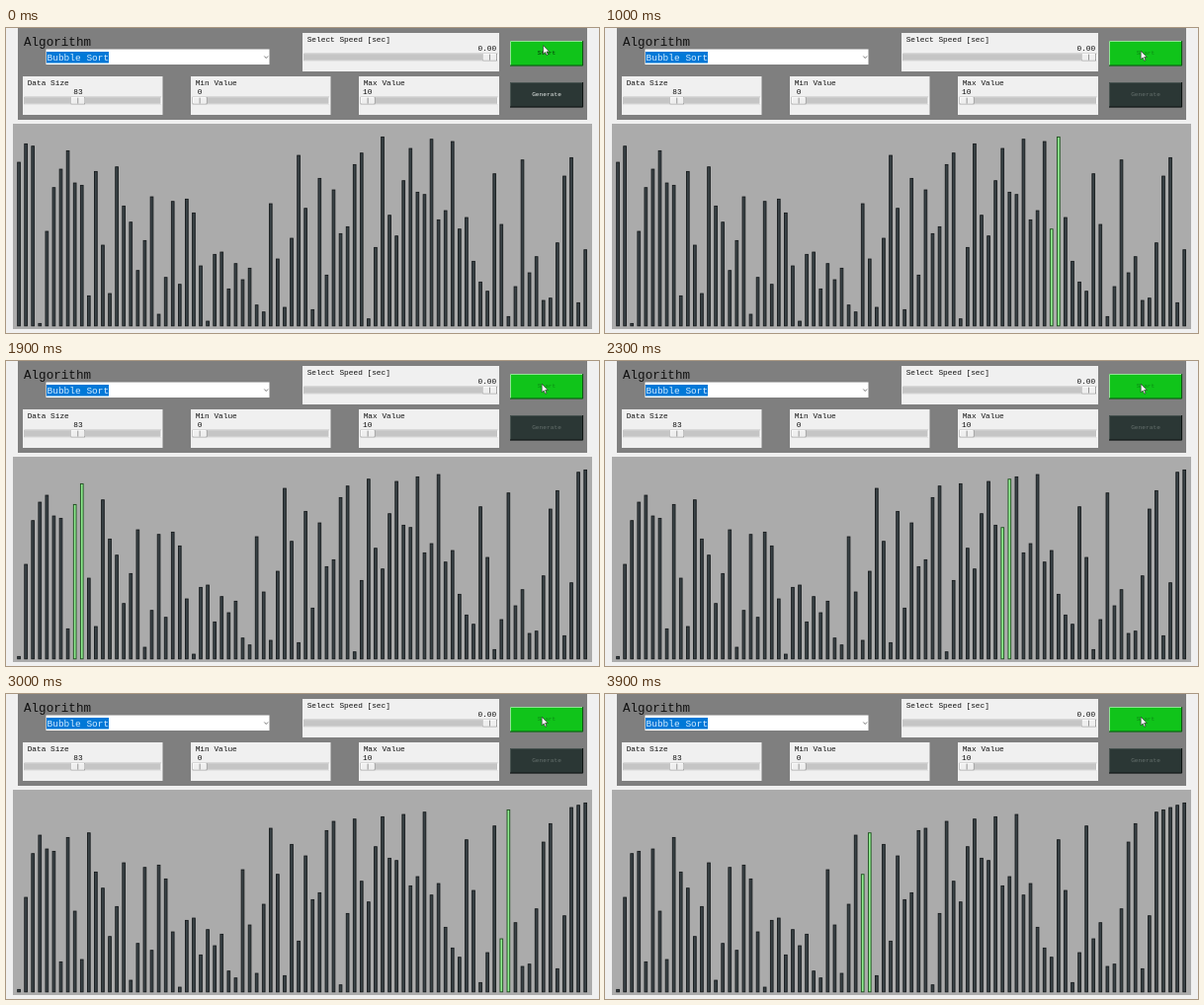
These frames come from a looping animation (600 by 309 pixels, 4000 ms). An HTML page:

```html
<!DOCTYPE html>
<html>
<head>
<meta charset="utf-8">
<style>
html, body { margin: 0; width: 100%; height: 100%; overflow: hidden; background: #f0f0f0; }
svg { display: block; width: 600px; height: 309px; }
text { font-family: "Liberation Mono", "Courier New", monospace; font-size: 7.8px; fill: #111; white-space: pre; }
.bar { fill: #3a4347; stroke: #15191b; stroke-width: .9; }
.bar.hot { fill: #90ee90; stroke: #1c4a1c; }
</style>
</head>
<body>
<svg id="stage" viewBox="0 0 600 309">
  <rect width="600" height="309" fill="#f0f0f0"/>
  <rect x="12" width="576" height="93" fill="#7f7f7f"/>
  <rect x="7" y="97" width="586" height="208" fill="#ababab"/>
  <text x="18" y="18" style="font-size:12.6px">Algorithm</text>
  <rect x="40.5" y="21.5" width="226" height="15.5" fill="#fff"/>
  <rect x="41" y="24" width="63" height="11.5" fill="#0078d7"/>
  <text x="41.5" y="32.5" style="font-size:9.5px;fill:#d5ebff">Bubble Sort</text>
  <path d="M261.3 28.5l1.9 2 1.9-2" fill="none" stroke="#555" stroke-width=".8"/>
  <g id="sliders"></g>
  <g id="buttons"></g>
  <g id="bars"></g>
  <path id="cursor" d="M0 0V8.6L2 6.8 3.4 10 4.8 9.4 3.4 6.3H6Z" fill="#fff" stroke="#222" stroke-width=".6"/>
</svg>
<script>
const LOOP = 4000, STEP = 100;
const byId = id => document.getElementById(id);

function add(parent, tag, attrs, content = '') {
  const el = document.createElementNS('http://www.w3.org/2000/svg', tag);
  for (const name in attrs) el.setAttribute(name, attrs[name]);
  el.textContent = content;
  return parent.appendChild(el);
}

function slider(x, y, width, label, value, knob, valueX) {
  const g = add(byId('sliders'), 'g', { transform: `translate(${x} ${y})` });
  const box = (x, y, w, h, fill) => add(g, 'rect', { x, y, width: w, height: h, fill });
  box(0, 0, width, 39, '#f0f0f0');
  add(g, 'text', { x: 4.7, y: 9.3 }, label);
  add(g, 'text', { x: valueX - x, y: 18.3 }, value);
  box(1.5, 20.7, width - 3, 7.6, '#a0a0a0');
  box(2, 21.2, width - 3, 7.1, '#fff');
  box(2, 21.2, width - 4, 6.6, '#c5c5c5');
  const k = knob - x;
  box(k, 21, 14.3, 7.2, '#6d6d6d');
  box(k, 21, 13.7, 6.6, '#fff');
  box(k + .6, 21.6, 13.1, 6, '#efefef');
  box(k + 6.7, 21.6, .8, 6, '#808080');
}
slider(300, 5, 199, 'Select Speed [sec]', '0.00', 482.5, 477.5);
slider(17, 49, 141.5, 'Data Size', '83', 65.7, 68.3);
slider(187, 49, 141.5, 'Min Value', '0', 189, 193.7);
slider(357, 49, 142, 'Max Value', '10', 359, 361);

function button(y, fill, light, dark, label) {
  const g = add(byId('buttons'), 'g', {});
  add(g, 'rect', { x: 510, y, width: 74, height: 25.3, fill });
  const upper = add(g, 'path', { d: `M510.5 ${y + 25}V${y + .5}H584`, fill: 'none' });
  const lower = add(g, 'path', { d: `M510 ${y + 25}H583.6V${y}`, fill: 'none' });
  const text = add(g, 'text', { x: 547, y: y + 14.4, 'text-anchor': 'middle', style: 'font-size:6.2px' }, label);
  return (color, sunken) => {
    upper.setAttribute('stroke', sunken ? dark : light);
    lower.setAttribute('stroke', sunken ? light : dark);
    text.style.fill = color;
  };
}
const drawStart = button(13, '#10c41a', '#8fe594', '#0b4d10', 'Start');
const drawGenerate = button(55, '#2b3735', '#46524f', '#0c1110', 'Generate');

// Rank 0 is the tallest bar.
const ranks = [
  11, 3, 4, 81, 41, 22, 14, 6, 20, 21, 69, 15, 47, 68, 13, 30, 37, 58, 45, 26, 77,
  61, 28, 64, 27, 33, 56, 80, 51, 50, 66, 55, 62, 57, 73, 76, 29, 53, 74, 44, 8,
  31, 75, 18, 60, 23, 42, 39, 12, 7, 79, 48, 0, 34, 43, 19, 5, 24, 25, 1, 36, 32,
  2, 40, 35, 54, 63, 67, 16, 38, 78, 65, 10, 59, 52, 71, 70, 46, 17, 9, 72, 49];
const bars = ranks.map((_, i) => add(byId('bars'), 'rect', { x: 11.7 + i * 7.076, width: 2.7 }));

function swapAt(list, j) {
  [list[j], list[j + 1]] = [list[j + 1], list[j]];
}

// Bubble sort, recording the position of every swap.
const swaps = [], work = [...ranks];
for (let end = work.length - 1; end > 0; end--) {
  for (let j = 0; j < end; j++) {
    if (work[j] < work[j + 1]) {
      swapAt(work, j);
      swaps.push(j);
    }
  }
}

// Number of swaps made by a given time.
const pace = [[500, 5], [600, 16], [1300, 94], [1900, 164], [2700, 256], [3400, 337], [3900, 396]];
function swapsBy(t) {
  if (t < pace[0][0]) return 0;
  const i = Math.max(1, pace.findIndex(p => p[0] >= t));
  const [t0, n0] = pace[i - 1], [t1, n1] = pace[i];
  return Math.round(n0 + (n1 - n0) * (t - t0) / (t1 - t0));
}

function draw(t) {
  const done = swaps.slice(0, swapsBy(t));
  const list = [...ranks];
  done.forEach(j => swapAt(list, j));
  const hot = done.length ? done[done.length - 1] : -9;
  bars.forEach((bar, i) => {
    const y = 110.4 + list[i] * 2.333;
    bar.setAttribute('y', y);
    bar.setAttribute('height', 301.8 - y);
    bar.setAttribute('class', i === hot || i === hot + 1 ? 'bar hot' : 'bar');
  });
  const running = t >= 500;
  drawStart(running ? '#0b8a13' : '#052d08', t >= 300 && !running);
  drawGenerate(running ? '#65706d' : '#e6ebe9', false);
  const move = Math.min(1, t / 300);
  byId('cursor').setAttribute('transform', `translate(${543.6 - 1.4 * move} ${17.6 + 5.6 * move})`);
}

function tick() {
  draw(Math.floor(performance.now() % LOOP / STEP) * STEP);
  requestAnimationFrame(tick);
}
tick();
</script>
</body>
</html>
```
